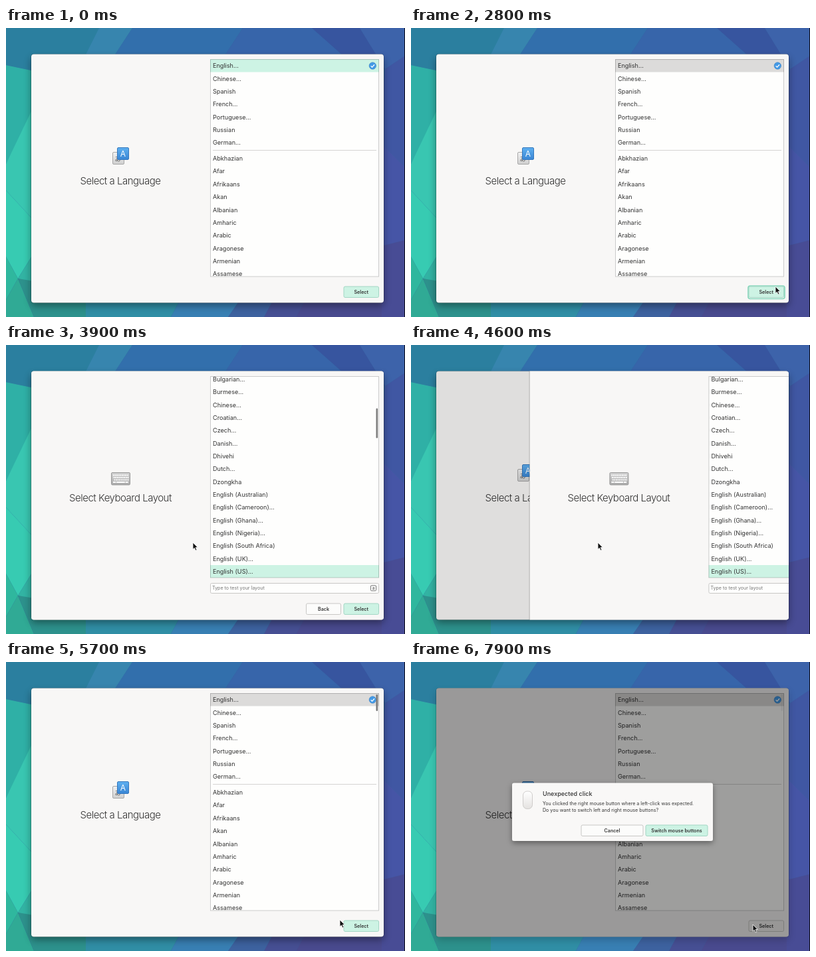
These frames come from a looping animation (600x436 px, 8 s). An HTML page:

```html
<!DOCTYPE html>
<html lang="en">
<head>
<meta charset="utf-8">
<title>Language setup</title>
<style>
html, body { margin: 0; width: 100%; height: 100%; overflow: hidden; background: #35629f; }
svg { display: block; width: 100vw; height: 100vh; font-family: Inter, "Open Sans", sans-serif; fill: #333; }
.row { font-size: 9.1px; }
.title { font-size: 15px; font-weight: 300; letter-spacing: -.5px; text-anchor: middle; }
.label { font-size: 7.1px; font-weight: 600; text-anchor: middle; }
.small { font-size: 7.1px; }
</style>
</head>
<body>
<svg id="stage" viewBox="0 0 600 436" preserveAspectRatio="none"></svg>
<script>
const LOOP = 8000, STEP = 100, ROW = 19.35, PAGE_WIDTH = 530;
const GREEN = "#cdf3e4", GREY = "#dcdbda";

const languages = ["English…", "Chinese…", "Spanish", "French…", "Portuguese…", "Russian", "German…"];
const moreLanguages = ["Abkhazian", "Afar", "Afrikaans", "Akan", "Albanian", "Amharic", "Arabic", "Aragonese", "Armenian", "Assamese"];
const layouts = ["Bulgarian…", "Burmese…", "Chinese…", "Croatian…", "Czech…", "Danish…", "Dhivehi", "Dutch…", "Dzongkha",
  ...["Australian)", "Cameroon)…", "Ghana)…", "Nigeria)…", "South Africa)", "UK)…", "US)…"].map(s => "English (" + s)];

const rect = (x, y, w, h, fill, extra = "") =>
  `<rect x="${x}" y="${y}" width="${w}" height="${h}" fill="${fill}" ${extra}/>`;
const text = (cls, x, y, s, extra = "") => `<text class="${cls}" x="${x}" y="${y}" ${extra}>${s}</text>`;
const rows = (names, center) => names.map((s, i) => text("row", 311, center + 3.3 + i * ROW, s)).join("");
const poly = (points, fill) => `<polygon points="${points}" fill="${fill}"/>`;
const button = (x, y, w, label, green, id = "") =>
  rect(x + .5, y + .5, w - 1, 16.5, green ? GREEN : "#fcfcfb",
    `id="${id}" rx="2" stroke="${green ? "#a3d6c4" : "#c8c7c5"}"`) +
  text("label", x + w / 2, y + 11.2, label);
const listFrame = (h, body, clip) =>
  rect(307, 47, 254, h, "#fefefd") + `<g clip-path="url(#${clip})">${body}</g>` +
  rect(307.5, 47.5, 253, h - 1, "none", 'stroke="#000" stroke-opacity=".2"');

const wallpaper = rect(0, 0, 600, 436, "#35629f") + [
  ["0,0 190,0 164,40 38,64 0,56", "#2b7f9f"],
  ["140,0 190,0 164,40 120,40", "#3785ae"],
  ["190,0 356,0 330,40 164,40", "#326fac"],
  ["356,0 460,0 505,40 330,40", "#3765aa"],
  ["460,0 532,0 570,62 505,40", "#37559f"],
  ["532,0 600,0 600,42 570,62", "#3d63aa"],
  ["570,62 600,42 600,210 560,170", "#4057a3"],
  ["560,170 600,210 600,320 560,330", "#4655a6"],
  ["560,330 600,320 600,436 560,436", "#484c95"],
  ["0,56 38,64 60,90 0,205", "#2fb0a6"],
  ["60,80 60,310 0,245 0,205", "#39c6b1"],
  ["0,245 60,310 18,378 0,345", "#37cbb2"],
  ["18,378 60,310 60,390", "#32b3a3"],
  ["0,345 18,378 0,410", "#2fb79e"],
  ["0,410 18,378 42,436 0,436", "#30aa95"],
  ["18,378 60,385 130,412 130,436 42,436", "#2d918c"],
  ["120,410 262,410 248,436 120,436", "#308ea5"],
  ["262,410 352,410 334,436 248,436", "#387fb3"],
  ["352,410 402,410 388,436 334,436", "#3d629f"],
  ["402,410 450,410 436,436 388,436", "#464f93"],
  ["450,410 565,410 565,436 436,436", "#494a8e"],
].map(p => poly(...p)).join("") + rect(599, 0, 1, 436, "#0b0b18");

const languageIcon =
  rect(160.5, 187.5, 17, 18, "url(#metal)", 'rx="1.5" stroke="#a8a8a8"') +
  text("row", 163.5, 201, "あ", 'font-size="10" style="font-family:\'Noto Sans CJK JP\',\'Noto Sans CJK\',sans-serif" fill="#555"') +
  rect(167.5, 180.5, 17, 18, "url(#blue)", 'rx="1.5" stroke="#3477bd"') +
  text("", 176, 193.6, "A", 'font-size="12" fill="#fff" text-anchor="middle"');

const keys = [195.5, 199, 202.5].map((y, r) =>
  `<path d="M${161 + r * .7} ${y + 1}H184.5" stroke="#fff" stroke-width="2.2" stroke-dasharray="1.8 .8"/>`).join("");
const keyboardIcon = rect(158.5, 192.5, 28, 18.5, "url(#keys)", 'rx="1.5" stroke="#999"') + keys +
  `<path d="M161 207H184.5" stroke="#fff" stroke-width="2.2" stroke-dasharray="4 .8 13 .8"/>`;

const languagePage = rect(38, 39, PAGE_WIDTH, 376, "#f8f7f6") + languageIcon +
  text("title", 172, 235.6, "Select a Language") +
  listFrame(328.5,
    rect(307, 47, 254, 19.5, GREEN, 'id="row"') +
    rows(languages, 57) + rect(311, 184, 246, 1, "#d5d4d3") + rows(moreLanguages, 196.8) +
    `<circle cx="551.3" cy="57" r="5.2" fill="#449ae6" stroke="#3a7fc2" stroke-width=".6"/>
     <path d="M548.7 57.2l1.9 1.9 3.4-3.8" fill="none" stroke="#fff" stroke-width="1.3"/>` +
    rect(556.5, 49, 2.6, 25, "#777", 'id="languageBar" rx="1.3"'), "languageClip") +
  rect(507, 389, 55, 19.5, "none", 'id="ring" rx="3" stroke="#84d6ba" stroke-width="1.6"') +
  button(507.5, 389.5, 53.5, "Select", true, "select");

const keyboardPage = rect(38, 39, PAGE_WIDTH, 376, "#f8f7f6") + keyboardIcon +
  text("title", 172, 235.6, "Select Keyboard Layout") +
  listFrame(304.5, rect(307, 332, 254, 20, GREEN) + rows(layouts, 51.6) +
    rect(556.5, 95.5, 2.6, 45, "#7d7d7d", 'id="layoutBar" rx="1.3"'), "layoutClip") +
  rect(307.5, 359.5, 253, 15, "#fefefd", 'rx="2" stroke="#c8c7c5"') +
  text("small", 310, 369.4, "Type to test your layout", 'fill="#777"') +
  rect(548.5, 362.8, 8, 8, "none", 'rx="1.2" stroke="#666" stroke-width=".9"') +
  text("", 552.5, 369, "a", 'font-size="6.5" fill="#444" text-anchor="middle"') +
  button(451, 389.5, 53, "Back", false) + button(507.5, 389.5, 53.5, "Select", true) +
  rect(37.3, 39, .9, 376, "#000", 'opacity=".25"');

const dialog =
  rect(152, 182.5, 302, 87.5, "#f9f8f7", 'rx="3" filter="url(#dialogShadow)"') +
  rect(168.5, 195, 14, 26.5, "url(#mouse)", 'rx="6" stroke="#c4c2c0" stroke-width=".8"') +
  text("", 198, 202.3, "Unexpected click", 'font-size="9" font-weight="500"') +
  text("small", 198, 216, "You clicked the right mouse button where a left-click was expected.") +
  text("small", 198, 225.5, "Do you want to switch left and right mouse buttons?") +
  button(255.5, 245.5, 94, "Cancel", false) + button(352.5, 245.5, 94, "Switch mouse buttons", true);

const gradient = (id, top, bottom) => `<linearGradient id="${id}" x2="0" y2="1">
  <stop stop-color="${top}"/><stop offset="1" stop-color="${bottom}"/></linearGradient>`;
const clip = (id, x, y, w, h, rx = 0) => `<clipPath id="${id}">${rect(x, y, w, h, "#000", `rx="${rx}"`)}</clipPath>`;

document.getElementById("stage").innerHTML = `<defs>
  ${gradient("metal", "#f2f2f2", "#cfcfcf")}${gradient("blue", "#5fb0f0", "#3a86d4")}
  ${gradient("keys", "#d2d2d2", "#aaa")}${gradient("mouse", "#fff", "#e4e2e0")}
  ${clip("windowClip", 38, 39.5, PAGE_WIDTH, 375, 4)}
  ${clip("languageClip", 307, 47, 254, 328)}${clip("layoutClip", 307, 47, 254, 304)}
  <filter id="blur" x="-10%" y="-10%" width="120%" height="120%"><feGaussianBlur stdDeviation="6"/></filter>
  <filter id="dialogShadow" x="-10%" y="-20%" width="120%" height="150%">
    <feDropShadow dx="0" dy="3" stdDeviation="4" flood-opacity=".4"/></filter>
  </defs>
  ${wallpaper}
  ${rect(38, 45, PAGE_WIDTH, 374, "#000", 'id="shadow" rx="4" filter="url(#blur)"')}
  ${rect(37.5, 39, PAGE_WIDTH + 1, 376, "#000", 'rx="4.5" opacity=".3"')}
  <g clip-path="url(#windowClip)">
    ${languagePage}
    ${rect(38, 39, PAGE_WIDTH, 376, "#000", 'id="shade"')}
    <g id="keyboard">${keyboardPage}</g>
    ${rect(38, 39, PAGE_WIDTH, 376, "#000", 'id="dim"')}
  </g>
  <g id="dialog">${dialog}</g>
  <path id="cursor" d="M0 0V10.3L2.4 8.2 4.1 12 5.9 11.2 4.2 7.5H7.3Z" fill="#111" stroke="#fff" stroke-width=".8"/>`;

const part = id => document.getElementById(id);
const set = (id, attributes) => {
  for (const [name, value] of Object.entries(attributes)) part(id).setAttribute(name, value);
};
const progress = (t, from, to) => Math.min(1, Math.max(0, (t - from) / (to - from)));
const easeOut = p => 1 - (1 - p) ** 3;
const smooth = p => p * p * (3 - 2 * p);

// time, x, y of the pointer tip
const pointer = [[1200, 601, 432], [1700, 548, 390], [3000, 548, 390], [3600, 281, 298],
  [5100, 281, 298], [5700, 502, 389], [6000, 514, 396]];

function pointerAt(t) {
  const next = pointer.findIndex(k => k[0] > t);
  if (next === 0) return [610, 440];
  if (next < 0) return pointer.at(-1).slice(1);
  const [a, b] = [pointer[next - 1], pointer[next]];
  const p = smooth(progress(t, a[0], b[0]));
  return [a[1] + (b[1] - a[1]) * p, a[2] + (b[2] - a[2]) * p];
}

function draw(t) {
  const shown = easeOut(progress(t, 2880, 3130)) - easeOut(progress(t, 4561, 4961));
  set("keyboard", { transform: `translate(${PAGE_WIDTH * (1 - shown)})`, visibility: shown > 0 ? "visible" : "hidden" });
  set("shade", { opacity: .14 * shown });

  const focused = (t >= 2800 && t < 4000) || (t >= 6400 && t < 6600);
  const backdrop = t >= 6600;
  set("row", { fill: t < 2800 ? GREEN : GREY });
  set("ring", { opacity: focused ? 1 : 0 });
  set("select", { fill: backdrop ? "#f4f3f2" : GREEN, stroke: backdrop ? "#c8c7c5" : "#a3d6c4" });
  set("languageBar", { opacity: progress(t, 5200, 5500) * (1 - .9 * progress(t, 6700, 7200)) });
  set("layoutBar", { opacity: progress(t, 3100, 3400) * (1 - progress(t, 4400, 4700)) });

  const dim = progress(t, 6350, 6480);
  set("dim", { opacity: .38 * dim });
  set("shadow", { opacity: .4 - .2 * dim });

  const opened = progress(t, 6434, 6634), scale = 1 + .05 * (1 - opened);
  set("dialog", {
    opacity: opened ** 1.5,
    transform: `translate(303 226.2) scale(${scale}) translate(-303 -226.2)`
  });
  set("cursor", { transform: `translate(${pointerAt(t).join(" ")})` });
}

const start = performance.now();
function tick() {
  const t = (performance.now() - start) % LOOP;
  draw(Math.floor(t / STEP) * STEP);
  requestAnimationFrame(tick);
}
tick();
</script>
</body>
</html>
```
